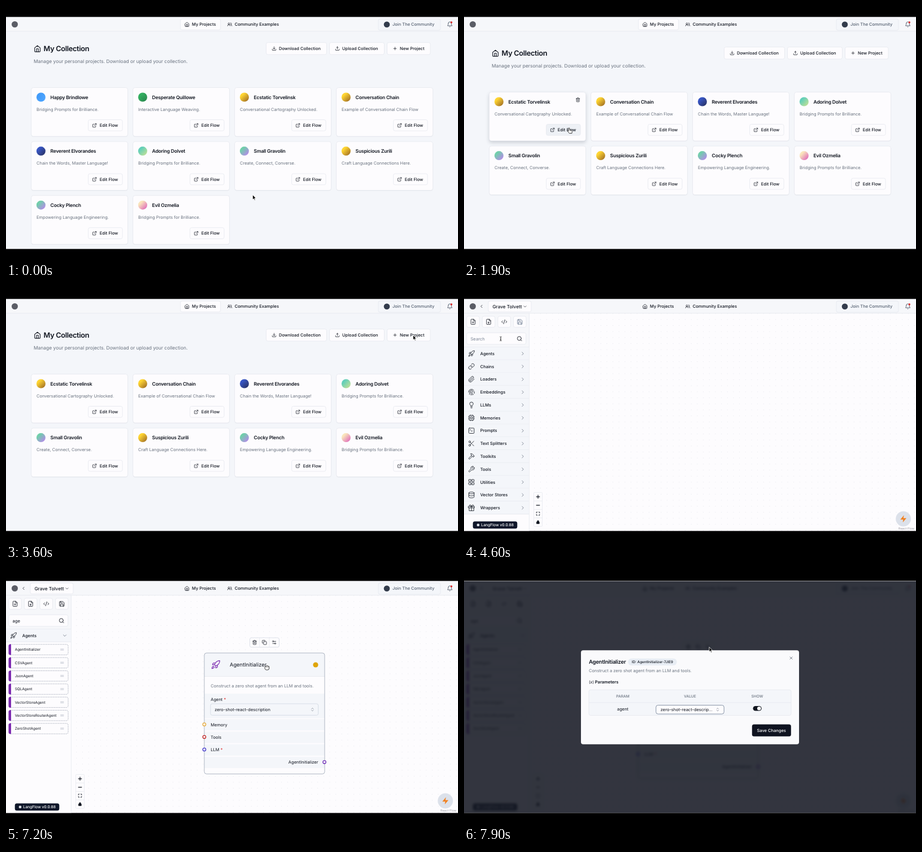
An HTML page that plays this animation: 800 px wide and 450 px high, repeating every 8 s.

```html
<!DOCTYPE html>
<html lang="en">
<head>
<meta charset="utf-8">
<title>Flow builder</title>
<style>
  html, body { margin: 0; width: 100%; height: 100%; overflow: hidden; background: #000; }
  svg { display: block; width: 100%; height: 100%; font-family: Inter, sans-serif; text-rendering: geometricPrecision; }
</style>
</head>
<body>
<svg id="stage" viewBox="0 0 800 450"></svg>
<script>
const INK = '#10151f', MUTED = '#69727f', LINE = '#e2e6ed', PANEL = '#f4f6fa', HEADER = '#f6f7fa', WHITE = '#fdfcfe', PURPLE = '#7c2ab0';
const LOOP = 8000, STEP = 100;

// 24-unit outline icons
const FILE = 'M14.5 2H6a2 2 0 0 0-2 2v16a2 2 0 0 0 2 2h12a2 2 0 0 0 2-2V7.5zM14 2v6h6M12 12v6';
const TRAY = 'M21 15v4a2 2 0 0 1-2 2H5a2 2 0 0 1-2-2v-4M12 15V3';
const ICONS = {
  home: 'M3 9l9-7 9 7v11a2 2 0 0 1-2 2H5a2 2 0 0 1-2-2zM9 22V12h6v10',
  users: 'M14 19a6 6 0 0 0-12 0M8 13a4 4 0 1 0 0-8 4 4 0 0 0 0 8M22 19a6 6 0 0 0-6-6 4 4 0 1 0 0-8',
  bell: 'M6 8a6 6 0 0 1 12 0c0 7 3 9 3 9H3s3-2 3-9M10.3 21a2 2 0 0 0 3.4 0',
  download: TRAY + 'M7 10l5 5 5-5',
  upload: TRAY + 'M17 8l-5-5-5 5',
  plus: 'M12 5v14M5 12h14',
  minus: 'M5 12h14',
  open: 'M15 3h6v6M10 14L21 3M18 13v6a2 2 0 0 1-2 2H5a2 2 0 0 1-2-2V8a2 2 0 0 1 2-2h6',
  trash: 'M3 6h18M19 6v14a2 2 0 0 1-2 2H7a2 2 0 0 1-2-2V6M8 6V4a2 2 0 0 1 2-2h4a2 2 0 0 1 2 2v2M10 11v6M14 11v6',
  search: 'M19 11a8 8 0 1 1-16 0 8 8 0 0 1 16 0M21 21l-4.3-4.3',
  left: 'M15 18l-6-6 6-6',
  right: 'M9 18l6-6-6-6',
  down: 'M6 9l6 6 6-6',
  updown: 'M7 15l5 5 5-5M7 9l5-5 5 5',
  close: 'M18 6L6 18M6 6l12 12',
  grip: 'M4 9h16M4 15h16',
  fileUp: FILE + 'M15 15l-3-3-3 3',
  fileDown: FILE + 'M9 15l3 3 3-3',
  code: 'M18 16l4-4-4-4M6 8l-4 4 4 4M14.5 4l-5 16',
  save: 'M19 21H5a2 2 0 0 1-2-2V5a2 2 0 0 1 2-2h11l5 5v11a2 2 0 0 1-2 2zM17 21v-8H7v8M7 3v5h8',
  rocket: 'M4.5 16.5c-1.5 1.3-2 5-2 5s3.7-.5 5-2c.7-.8.7-2.1-.1-2.9a2.2 2.2 0 0 0-2.9-.1zM12 15l-3-3a22 22 0 0 1 2-4A13 13 0 0 1 22 2c0 2.7-.8 7.5-6 11a22 22 0 0 1-4 2zM9 12H4s.5-3 2-4c1.6-1 5 0 5 0M12 15v5s3-.5 4-2c1-1.6 0-5 0-5',
  link: 'M10 13a5 5 0 0 0 7.5.5l3-3a5 5 0 0 0-7-7l-1.8 1.7M14 11a5 5 0 0 0-7.5-.5l-3 3a5 5 0 0 0 7 7l1.8-1.7',
  clip: 'M21.4 11l-9.2 9.2a6 6 0 0 1-8.4-8.4l8.5-8.6A4 4 0 1 1 18 8.8l-8.6 8.6a2 2 0 0 1-2.8-2.8L15 6',
  print: 'M2 12a10 10 0 0 1 18-6M5 19.5C5.5 18 6 15 6 12a6 6 0 0 1 12 0M12 10a2 2 0 0 0-2 2c0 1 0 2.5-.3 4M17.3 21l.5-3M14 13c0 2.4 0 6.4-1 9M9 21l.7-2M22 16c.2-2 .1-5.4 0-6',
  bulb: 'M9 18h6M10 22h4M15 14c.2-1 .7-1.7 1.5-2.5A5 5 0 0 0 18 8 6 6 0 0 0 6 8c0 1 .2 2.2 1.5 3.5.7.7 1.3 1.5 1.5 2.5z',
  chip: 'M5 4h14v16H5zM9 9h6v6H9zM15 2v2M15 20v2M2 15h2M2 9h2M20 15h2M20 9h2M9 2v2M9 20v2',
  prompt: 'M5 3h14a2 2 0 0 1 2 2v14a2 2 0 0 1-2 2H5a2 2 0 0 1-2-2V5a2 2 0 0 1 2-2zM7 11l2-2-2-2M11 13h4',
  scissors: 'M9 6a3 3 0 1 1-6 0 3 3 0 0 1 6 0M9 18a3 3 0 1 1-6 0 3 3 0 0 1 6 0M20 4L8 16M14.5 14.5L20 20M8 8l4 4',
  hammer: 'M15 12l-8.5 8.5a2 2 0 0 1-3-3L12 9M17.6 15l4.4-4.4M20.9 11.7l-2-2V7.3L16 4.6A6 6 0 0 0 12 3H9l1 .8a6 6 0 0 1 2 4.6V10l2 2h2.5l2.2 1.9',
  wrench: 'M14.7 6.3a1 1 0 0 0 0 1.4l1.6 1.6a1 1 0 0 0 1.4 0l3.8-3.8a6 6 0 0 1-8 8l-6.9 6.9a2 2 0 0 1-3-3l7-7a6 6 0 0 1 8-8z',
  grid: 'M4 3h6v7H3V4zM14 3h6l1 1v6h-7zM14 14h7v6l-1 1h-6zM3 14h7v7H4l-1-1z',
  database: 'M21 5c0 1.7-4 3-9 3S3 6.7 3 5s4-3 9-3 9 1.3 9 3zM21 12c0 1.7-4 3-9 3s-9-1.3-9-3M3 5v14c0 1.7 4 3 9 3s9-1.3 9-3V5',
  gift: 'M20 12v10H4V12M2 7h20v5H2zM12 22V7M12 7H7.5a2.5 2.5 0 0 1 0-5C11 2 12 7 12 7zM12 7h4.5a2.5 2.5 0 0 0 0-5C13 2 12 7 12 7z',
  fit: 'M8 3H3v5M16 3h5v5M8 21H3v-5M16 21h5v-5',
  lock: 'M5 11h14v10H5zM8 11V7a4 4 0 0 1 8 0v4',
  zap: 'M13 2L3 14h9l-1 8 10-12h-9z',
  copy: 'M10 8h10a2 2 0 0 1 2 2v10a2 2 0 0 1-2 2H10a2 2 0 0 1-2-2V10a2 2 0 0 1 2-2zM4 16a2 2 0 0 1-2-2V4a2 2 0 0 1 2-2h10a2 2 0 0 1 2 2',
  sliders: 'M20 7h-9M14 17H5M20 17a3 3 0 1 1-6 0 3 3 0 0 1 6 0M10 7a3 3 0 1 1-6 0 3 3 0 0 1 6 0',
};

const AVATARS = {
  sky: ['#2b8ff8', '#389aff'], green: ['#1aa64d', '#127a3b'], gold: ['#ffd01a', '#99600a'],
  navy: ['#1f41bd', '#111b55'], mint: ['#4fc9b0', '#b9dc8a'], lilac: ['#5fc9a0', '#ae7ae8'], rose: ['#f9e2b4', '#dc58b2'],
};

const PROJECTS = [
  ['Happy Brindlowe', 'Bridging Prompts for Brilliance.', 'sky'],
  ['Desperate Quillowe', 'Interactive Language Weaving.', 'green'],
  ['Ecstatic Torvelinsk', 'Conversational Cartography Unlocked.', 'gold'],
  ['Conversation Chain', 'Example of Conversational Chain Flow', 'gold'],
  ['Reverent Elvorandes', 'Chain the Words, Master Language!', 'navy'],
  ['Adoring Dolvet', 'Bridging Prompts for Brilliance.', 'mint'],
  ['Small Gravolin', 'Create, Connect, Converse.', 'lilac'],
  ['Suspicious Zurili', 'Craft Language Connections Here.', 'gold'],
  ['Cocky Plench', 'Empowering Language Engineering.', 'lilac'],
  ['Evil Ozmelia', 'Bridging Prompts for Brilliance.', 'rose'],
];

const CATEGORIES = [['Agents', 'rocket'], ['Chains', 'link'], ['Loaders', 'clip'], ['Embeddings', 'print'], ['LLMs', 'bulb'],
  ['Memories', 'chip'], ['Prompts', 'prompt'], ['Text Splitters', 'scissors'], ['Toolkits', 'hammer'], ['Tools', 'wrench'],
  ['Utilities', 'grid'], ['Vector Stores', 'database'], ['Wrappers', 'gift']];
const AGENTS = ['AgentInitializer', 'CSVAgent', 'JsonAgent', 'SQLAgent', 'VectorStoreAgent', 'VectorStoreRouterAgent', 'ZeroShotAgent'];

// Pointer keyframes: time, x, y
const PATH = [[0, 436.5, 334.5], [900, 202, 159], [1600, 202, 159], [1900, 186, 216], [2300, 186, 216], [3500, 720.5, 83.5],
  [3800, 720.5, 83.5], [4500, 65, 90], [5000, 65, 90], [5300, 50, 141], [5400, 50, 141], [6100, 426, 140], [6200, 426, 140],
  [6800, 538, 165], [7000, 538, 165], [7200, 462, 173], [7400, 419, 181], [7500, 419, 181], [7800, 434, 136.5], [8000, 434, 136.5]];
const OPEN_FLOW = 3900, DROP = 6100, GRAB = 7000, RELEASE = 7400, DIALOG = 7900;

const rect = (x, y, w, h, fill, r = 0, stroke = 'none', extra = '') =>
  `<rect x="${x}" y="${y}" width="${w}" height="${h}" rx="${r}" fill="${fill}" stroke="${stroke}" stroke-width=".7" ${extra}/>`;
const dot = (x, y, r, fill, stroke = 'none', width = 1.3) =>
  `<circle cx="${x}" cy="${y}" r="${r}" fill="${fill}" stroke="${stroke}" stroke-width="${width}"/>`;
// Text placed by the middle of its capitals
const text = (x, cy, str, size = 7.5, color = INK, weight = 400, extra = '') =>
  `<text x="${x}" y="${cy + size * .36}" font-size="${size}" fill="${color}" font-weight="${weight}" ${extra}>${str}</text>`;
const icon = (name, cx, cy, size = 8.5, color = INK, width = 2, fill = 'none') =>
  `<path transform="translate(${cx - size / 2} ${cy - size / 2}) scale(${size / 24})" d="${ICONS[name]}" fill="${fill}" stroke="${color}" stroke-width="${width}" stroke-linecap="round" stroke-linejoin="round"/>`;
const button = (x, y, w, h, name, label, fill = WHITE) =>
  rect(x, y, w, h, fill, 3, LINE) + icon(name, x + 14, y + h / 2) + text(x + 22.5, y + h / 2, label, 7.5, INK, 500);
const line = (x1, y1, x2, y2) => `<path d="M${x1} ${y1}L${x2} ${y2}" stroke="${LINE}" stroke-width=".7"/>`;
const shifted = (x, y, body, extra = '') => `<g transform="translate(${x} ${y})" ${extra}>${body}</g>`;
const TIGHT = 'letter-spacing="-.025em"', RIGHT = 'text-anchor="end"', MIDDLE = 'text-anchor="middle"';

const DEFS = '<defs>' + Object.entries(AVATARS).map(([id, [from, to]]) =>
  `<linearGradient id="${id}" x1=".1" y1=".1" x2=".9" y2=".9"><stop offset=".2" stop-color="${from}"/><stop offset="1" stop-color="${to}"/></linearGradient>`).join('') +
  '<pattern id="stripes" width="2" height="2" patternUnits="userSpaceOnUse" patternTransform="rotate(45)"><path d="M0 .5h2" stroke="#fff" stroke-opacity=".28" stroke-width=".8"/></pattern>' +
  '<pattern id="dots" x="119.5" y="50.5" width="10.67" height="10.67" patternUnits="userSpaceOnUse"><circle cx="5.3" cy="5.3" r=".45" fill="#c9cdd8"/></pattern>' +
  '<clipPath id="window"><path d="M0 20h800v410.3H0z"/></clipPath></defs>';

function pointerAt(t) {
  const i = Math.max(1, PATH.findIndex(p => p[0] > t));
  const [t0, x0, y0] = PATH[i - 1], [t1, x1, y1] = PATH[i];
  const u = (t - t0) / (t1 - t0), e = u * u * (3 - 2 * u);
  return { x: x0 + (x1 - x0) * e, y: y0 + (y1 - y0) * e };
}

function header(home) {
  return rect(0, 20, 800, 25, HEADER) + line(0, 44.7, 800, 44.7) + dot(15.5, 32.5, 5.5, '#5b5d66') +
    (home ? rect(308.7, 23, 71, 19.3, WHITE, 3, LINE)
      : icon('left', 31, 32.5, 9) + rect(43, 23, 76, 19.3, WHITE, 3, LINE) + text(50.5, 32.6, 'Grave Tolvett', 8.2, INK, 500) + icon('down', 108, 32.8, 8)) +
    icon('home', 320.3, 32.6, 9) + text(329, 32.6, 'My Projects', 7.5, INK, 500) +
    icon('users', 396, 32.6, 9) + text(404.7, 32.6, 'Community Examples', 7.55, INK, 500) +
    rect(659, 23, 110, 20, PANEL, 3, LINE) + dot(674, 32.7, 5.3, '#333c4c') +
    text(684, 32.6, 'Join The Community', 7.5, '#556070', 500) +
    icon('bell', 785.5, 32.7, 11, '#3c4758', 1.8) + dot(788.3, 29, 1.7, '#dc2626');
}

function card([name, blurb, paint], x, y, p) {
  const px = p.x - x, py = p.y - y;
  const over = px > 0 && px < 171 && py > 0 && py < 86.5;
  const overButton = over && px > 101 && py > 57 && py < 77;
  return shifted(x, y,
    rect(0, .8, 171, 86.5, '#0f172a', 4, 'none', 'opacity=".06"') +
    rect(0, 0, 171, 86.5, WHITE, 4, LINE, over ? 'style="filter:drop-shadow(0 3px 3px #0f172a2a)"' : '') +
    dot(17.3, 17, 8, `url(#${paint})`) + dot(17.3, 17, 8, 'url(#stripes)') +
    text(34, 17, name, 8.53, INK, 600, TIGHT) + text(9.4, 38.3, blurb, 7.5, MUTED) +
    (over ? icon('trash', 157, 13.7, 8.5) : '') +
    rect(101, 57, 60.5, 19.7, overButton ? '#eef1f6' : WHITE, 3, LINE) +
    icon('open', 112, 67, 8.5) + text(121.2, 67, 'Edit Flow', 7.5, INK, 500));
}

function homePage(t, p) {
  const projects = PROJECTS.slice(t < 1200 ? 0 : t < 1600 ? 1 : 2);
  const top = projects.length > 8 ? 0 : 8;
  return rect(0, 20, 800, 411, PANEL) + shifted(0, top,
    icon('home', 55.6, 75.7, 13) + text(66.6, 75.8, 'My Collection', 12.75, INK, 600, TIGHT) +
    text(49, 98, 'Manage your personal projects. Download or upload your collection.', 8.45, MUTED) +
    button(460.5, 64.7, 107, 21.3, 'download', 'Download Collection') +
    button(572.5, 64.7, 97, 21.3, 'upload', 'Upload Collection') +
    button(674.5, 64.7, 76.5, 21.3, 'plus', 'New Project')) +
    projects.map((item, i) => card(item, 44.6 + 180 * (i % 4), 144.5 + top + 95.6 * Math.floor(i / 4), p)).join('') + header(true);
}

const chip = (name, x, y) => rect(x, y, 105, 18.5, WHITE, 3, '#8d96a5', 'stroke-dasharray="1.8 1.2"') +
  `<path d="M${x + 4} ${y - .3}h-1.4a3 3 0 0 0-3 3v13.1a3 3 0 0 0 3 3h1.4z" fill="${PURPLE}"/>` +
  text(x + 10.7, y + 9.2, name, 6.45) + icon('grip', x + 94.3, y + 9.2, 8, '#9aa3b2', 1.8);

function category([name, glyph], i, open) {
  const y = 104.8 + 22.77 * i;
  return rect(0, y, 115, 22.77, PANEL) + line(0, y + 22.5, 115, y + 22.5) + icon(glyph, 13.2, y + 11.4, 12.5, INK, 1.6) +
    text(28.7, y + 11.3, name, 7.5, INK, 500) + icon(open ? 'down' : 'right', 104, y + 11.4, 10, '#556070', 1.7);
}

function sidebar(t) {
  const typed = 'age'.slice(0, (t >= 4700) + (t >= 4800) + (t >= 5000));
  const tools = ['fileUp', 'fileDown', 'code', 'save'].map((name, i) =>
    rect(4.7 + 27.6 * i, 50, 22.6, 19.7, WHITE, 3, LINE) +
    icon(name, 16 + 27.6 * i, 59.9, 11, name == 'save' && t <= DROP ? '#64748b' : INK, 1.8)).join('');
  const list = typed
    ? category(CATEGORIES[0], 0, true) + AGENTS.map((name, i) => chip(name, 5, 131.8 + 23.33 * i)).join('')
    : CATEGORIES.map((c, i) => category(c, i, false)).join('');
  return rect(0, 45, 115.3, 386, WHITE) + rect(0, 45, 115.3, 60, HEADER) + line(115.4, 45, 115.4, 431) + tools +
    rect(4.7, 79.3, 105, 20.5, WHITE, 3, LINE) + text(11.4, 89.8, typed || 'Search', 7.7, typed ? INK : '#7d8696') +
    icon('search', 98.3, 89.8, 10.5) + line(0, 104.6, 115, 104.6) + list +
    rect(15.7, 413.5, 78.6, 12.8, '#0f172a', 3.5) + dot(25, 419.9, 2.4, '#d8dbe2') +
    text(30.3, 419.9, 'LangFlow v0.0.88', 6.8, '#fff', 500);
}

function node(t, p) {
  const x = t < GRAB ? 427 : t < RELEASE ? p.x - 111 : 308;
  const y = t < GRAB ? 139 : t < RELEASE ? p.y - 26 : 155;
  const ready = t > DROP, selected = t >= GRAB;
  const handles = [['#e5a93a', 126.6], ['#c02626', 148.8], ['#4338ca', 171]].map(([c, hy]) =>
    dot(0, ready ? hy : 1, 2.7, WHITE, ready ? c : '#7030b8')).join('') + dot(212.6, ready ? 193.3 : 1, 2.7, WHITE, '#7030b8');
  const star = '<tspan fill="#dc2626"> *</tspan>';
  const toolbar = rect(80.5, -27, 52, 16.8, WHITE, 3, '#cfd6e0') + line(97.7, -27, 97.7, -10.5) + line(115, -27, 115, -10.5) +
    ['trash', 'copy', 'sliders'].map((name, i) => icon(name, 89 + 17.3 * i, -18.7, 9)).join('');
  return shifted(x, y,
    rect(0, 0, 213, 214.3, WHITE, 4) + `<path d="M0 41.5V4a4 4 0 0 1 4-4h205a4 4 0 0 1 4 4v37.5z" fill="${PANEL}"/>` + line(0, 41.5, 213, 41.5) +
    [[72, 43.5], [117.3, 20], [139.5, 20], [161.7, 20], [184, 20]].map(([ry, h]) => rect(0, ry, 213, h, PANEL)).join('') +
    rect(0, 0, 213, 214.3, 'none', 4, selected ? '#8d98aa' : LINE) +
    icon('rocket', 20.2, 20.8, 17, PURPLE, 1.7) + text(45, 20.9, 'AgentInitializer', 9.3) +
    (ready ? dot(197, 21, 4.6, '#dfa50a') : '') +
    text(11.3, 58, 'Construct a zero shot agent from an LLM and tools.', 7.5, MUTED) +
    text(11.3, 82.5, 'Agent' + star) + rect(11, 90, 190.7, 20.3, PANEL, 3, '#cbd3df') +
    text(18.2, 100.2, 'zero-shot-react-description', 7.5) + icon('updown', 191.4, 100.2, 8, MUTED) +
    text(11.3, 126.8, 'Memory') + text(11.3, 149, 'Tools') + text(11.3, 171.3, 'LLM' + star) +
    text(201.5, 193.5, 'AgentInitializer', 7.5, INK, 400, RIGHT) + handles + (selected ? toolbar : ''));
}

function flowPage(t, p) {
  const controls = rect(123.5, 362.3, 15, 60, WHITE, 1, LINE) + ['plus', 'minus', 'fit', 'lock'].map((name, i) =>
    icon(name, 131, 369.8 + 15 * i, i < 2 ? 10 : 7.5, INK, 2.8, i == 3 ? INK : 'none') + (i ? line(123.5, 362.3 + 15 * i, 138.5, 362.3 + 15 * i) : '')).join('');
  return rect(0, 20, 800, 411, WHITE) + rect(116, 45, 684, 386, 'url(#dots)') + controls +
    dot(777.6, 409, 13.4, '#dce1ea') + icon('zap', 777.6, 409, 13, '#f08020', 1, '#f08020') +
    text(769, 425.8, 'React Flow', 5.4, '#9a9aa2') +
    (t >= DROP ? node(t, p) : '') + sidebar(t) + header(false) +
    (t > 5400 && t < DROP ? shifted(p.x, p.y, chip(AGENTS[0], 0, 0), 'opacity=".7"') : '');
}

function dialog() {
  return rect(0, 20, 800, 411, '#151923', 0, 'none', 'opacity=".87"') + rect(207, 142.3, 386, 166.4, '#fafafc', 4) +
    text(221, 162.7, 'AgentInitializer', 9.5, INK, 600, TIGHT) + rect(290.3, 156.7, 86.4, 12.3, '#e8edf4', 6.1) +
    text(297, 162.9, 'ID: AgentInitializer-7JIE9', 6.25, INK, 500) + icon('close', 579, 156, 8.5, '#4a5364') +
    text(221, 178.3, 'Construct a zero shot agent from an LLM and tools.', 7.5, MUTED) +
    text(221, 198, '(<tspan font-style="italic">x</tspan>)', 7) + text(231.8, 198.2, 'Parameters', 7.5, INK, 600) +
    rect(221, 212.3, 358, 45.2, PANEL, 3, LINE) + line(221, 235, 579, 235) +
    ['PARAM', 'VALUE', 'SHOW'].map((s, i) => text(281 + 119 * i, 224, s, 6.6, MUTED, 500, MIDDLE)).join('') +
    text(281, 246.3, 'agent', 7.5, INK, 400, MIDDLE) + rect(339.8, 239.5, 120.4, 15.6, WHITE, 3.5, '#8793a6', 'style="stroke-width:1"') +
    text(347.8, 247.3, 'zero-shot-react-descrip...', 7.5) + icon('updown', 449, 247.3, 8, MUTED) +
    rect(511.5, 241, 15.2, 8.6, INK, 4.3) + dot(522.3, 245.3, 3.3, '#fff') +
    rect(509.8, 273.5, 69, 21.2, '#0f1320', 3.5) + text(544.2, 284.1, 'Save Changes', 7.5, '#fff', 500, MIDDLE);
}

const CURSORS = {
  arrow: ['M0 0v8.6l2-1.9 1.3 3.1 1.4-.6-1.3-3H6z', '#000', '#fff'],
  hand: ['M0 0c.8 0 1.1.5 1.1 1.1v2.8l3.3.8c.8.2 1.1.8 1 1.5L4.9 9.6H.4L-2.5 6c-.5-.7.4-1.3 1-.8l.6.6V1.1C-.9.5-.6 0 0 0z', '#fff', '#111'],
  fist: ['M-3.8-.6q-.2-2.2 1.7-1.9.6-1.6 2-.8 1.5-.8 2.1.6 1.9-.2 1.7 1.6V1q0 3-2.6 3h-2.5q-1.6 0-2.4-2.4zM-1.6-2v1.4M.2-2.4v1.6M2-2v1.4', '#fff', '#111'],
  beam: ['M-1.6-3.6q1.6 0 1.6 1v5.2q0 1-1.6 1M1.6-3.6Q0-3.6 0-2.6M0 2.6q0 1 1.6 1M-1 .8h2', 'none', '#111'],
};

function cursorKind(t, { x, y }) {
  if (t < OPEN_FLOW) return x > 145 && x < 206 && y > 209 && y < 229 && t >= 1600 || t >= 800 && t <= 1600 ? 'hand' : 'arrow';
  if (t > 5200 && t < 7500) return 'fist';
  return x < 110 && y > 79 && y < 100 ? 'beam' : 'arrow';
}

function cursor(t, p) {
  const [d, fill, stroke] = CURSORS[cursorKind(t, p)];
  return shifted(p.x, p.y, `<path d="${d}" fill="${fill}" stroke="${stroke}" stroke-width=".8" stroke-linejoin="round"/>`);
}

function scene(t) {
  const p = pointerAt(t), open = t >= DIALOG;
  const page = t < OPEN_FLOW ? homePage(t, p) : flowPage(t, p);
  // The window's top edge stays light above the dialog's backdrop
  return DEFS + rect(0, 0, 800, 450, '#000') + rect(0, 19, 800, 1, '#9a9a9e') +
    '<g clip-path="url(#window)">' + rect(0, 20, 800, 411, WHITE) +
    `<g ${open ? 'style="filter:blur(2.1px)"' : ''}>${page}</g>` + (open ? dialog() : '') + cursor(t, p) + '</g>';
}

const stage = document.getElementById('stage');
let shown = -1;
function tick(now) {
  const t = Math.floor(now % LOOP / STEP) * STEP;
  if (t !== shown) stage.innerHTML = scene(shown = t);
  requestAnimationFrame(tick);
}
tick(0);
</script>
</body>
</html>
```
